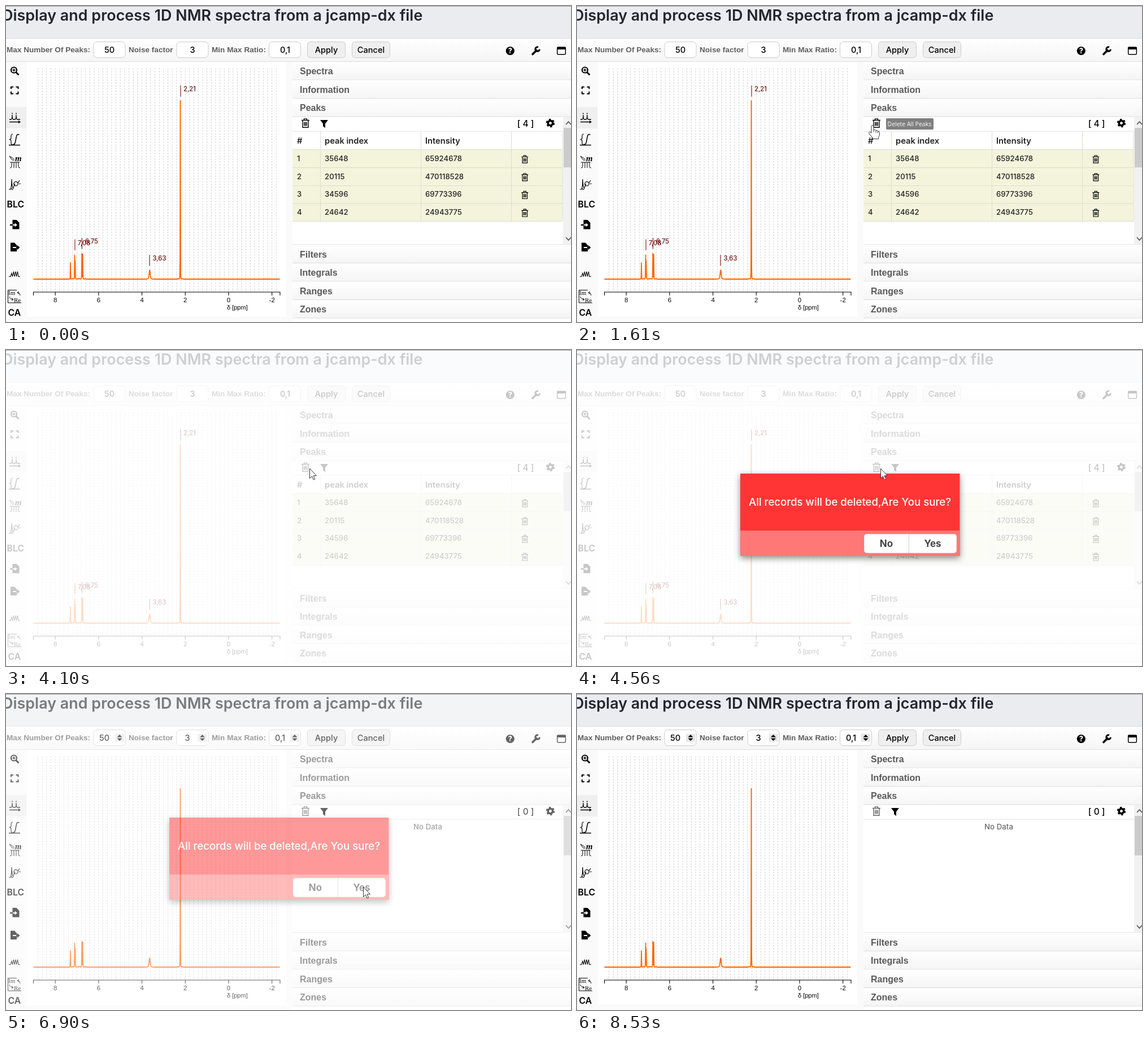
These frames come from a looping animation (1000x560 px, 9480 ms). An HTML page:

```html
<!DOCTYPE html>
<html lang="en">
<head>
<meta charset="utf-8">
<title>NMR peak deletion</title>
<style>
  html, body { margin: 0; height: 100%; overflow: hidden; background: #fafafa; }
  svg { display: block; width: 100vw; height: 100vh; }
  text { font: 500 14.6px Inter, sans-serif; }
  .title { font-size: 26.95px; font-weight: 600; fill: #24252d; }
  .label { font: bold 13.6px "Liberation Sans", Arial, sans-serif; fill: #5f5f5f; }
  .panel { font: bold 16px "Liberation Sans", Arial, sans-serif; fill: #5a5a5a; }
  .axis { font: 11.5px "Liberation Sans", Arial, sans-serif; }
  .head { font-weight: 600; font-size: 14.7px; fill: #222; }
  .cell { font-size: 13.2px; fill: #222; }
  .peak { font-size: 11.2px; fill: #6e1010; }
  .tool { font-size: 15.8px; font-weight: 600; }
  .serif { font: 11px "Liberation Serif", serif; }
  .mid { text-anchor: middle; }
  .line { fill: none; stroke: #000; }
</style>
</head>
<body>
<svg id="stage" viewBox="0 0 1000 560" preserveAspectRatio="none"></svg>
<script>
const LOOP = 9480;
const text = (x, y, s, cls = '', extra = '') => `<text x="${x}" y="${y}" class="${cls}" ${extra}>${s}</text>`;
const rect = (x, y, w, h, fill, extra = '') => `<rect x="${x}" y="${y}" width="${w}" height="${h}" fill="${fill}" ${extra}/>`;
const line = (d, width = 1, stroke = '#000', extra = '') =>
  `<path class="line" d="${d}" style="stroke:${stroke};stroke-width:${width}" ${extra}/>`;
const group = (id, body) => `<g id="${id}">${body}</g>`;
const bin = (x, y, scale = 1) =>
  `<g transform="translate(${x} ${y}) scale(${scale})">` +
  line('M-7-5H7M-2.5-5V-7.6H2.5V-5M-5-5V7.8H5V-5M-2.2-2V5M0-2V5M2.2-2V5', 1.4) + '</g>';

function header() {
  const field = x => rect(x, 63.5, 56, 28, '#fff', 'rx="6" stroke="#ccc"');
  const button = (x, w, s) => rect(x, 63.5, w, 28, '#efefef', 'rx="5" stroke="#ccc"') + text(x + w / 2, 82.5, s, 'mid');
  const values = dx => [[183, '50'], [330, '3'], [494, '0,1']].map(([x, s]) => text(x + dx, 82.5, s, 'mid')).join('');
  const spinners = [201, 347.5, 511].map(x =>
    rect(x - 8, 70.5, 16, 14, '#e6e6e6') +
    `<path d="M${x - 4.5} 76.5l4.5-4.5 4.5 4.5zM${x - 4.5} 78.5l4.5 4.5 4.5-4.5z"/>`).join('');
  return rect(0, 0, 1000, 57.5, '#ebecf0') + rect(0, 0, 1000, 1, '#a0a0a0') +
    text(-7, 25.5, 'Display and process 1D NMR spectra from a jcamp-dx file', 'title') +
    rect(0, 57.5, 1000, 41, 'url(#bar)') + line('M0 57.5H1000M0 98.5H1000', 1, '#dedede') +
    text(1, 81.5, 'Max Number Of Peaks:', 'label') + text(217, 81.5, 'Noise factor', 'label') +
    text(364, 81.5, 'Min Max Ratio:', 'label') +
    field(155) + field(302) + field(465.5) + button(533.5, 67, 'Apply') + button(612.5, 67, 'Cancel') +
    group('plainValues', values(0)) + group('spinValues', values(-9) + spinners) +
    '<circle cx="892.3" cy="79.5" r="7.6"/>' +
    text(892.3, 84, '?', 'mid', 'style="fill:#fff;font-weight:800;font-size:12.5px"') +
    line('M932 85.5L939 78.5', 3.6, '#000', 'stroke-linecap="round"') + line('M942 73a3.8 3.8 0 1 0 2.4 3.6', 3) +
    rect(975.7, 73.2, 14.6, 12.6, '#fff', 'rx="1.5" stroke="#000" stroke-width="1.5"') + rect(975, 72.5, 16, 4.5, '#000', 'rx="1.5"');
}

function toolbar() {
  return rect(0, 179, 36, 38, '#efefef') +
    '<circle class="line" cx="14" cy="113.5" r="5" stroke-width="2.2"/>' +
    line('M17.8 117.5l4.7 4.7', 2.8) + line('M11.2 113.5h5.6M14 110.7v5.6', 1.4) +
    line('M9 147v-3.5h4M17.5 143.5h4v3.5M21.5 151.5v4h-4M13 155.5H9v-4', 2) +
    line('M6 201h3q2 0 2-8 0 8 2 8h3q2 0 2-8 0 8 2 8h5M6 205.5h19m-3-2l3 2-3 2', 1.3) +
    '<circle cx="11" cy="190.5" r="1"/><circle cx="18" cy="190.5" r="1"/>' +
    line('M12 227q-3 0-3 4v3q0 2-3 2.5 3 .5 3 2.5v3q0 4 3 4', 1.2) +
    line('M23.5 228q-4-2-5 3l-2 10q-1 5-4 4M5 246.5h20', 1.5) +
    line('M6 266l8 5M6 266l5 7h4M7 277h17M10 277v7q0 3-3 3M14 277v10M18 277v10M22 277v7q0 3 3 3', 1) +
    text(16, 275, 'm', 'serif', 'style="font-size:15px;font-style:italic;font-weight:bold"') +
    line('M5 325h3q2-4 2-18 1 18 3 15l3-7M24 309l-3 5M23 315h3M9 323q2 5 4 0', 1.2) +
    '<circle class="line" cx="17.5" cy="315" r="3.7" stroke-width="1.2"/>' +
    text(1.5, 357, 'BLC', 'tool') +
    '<path d="M11.5 379h7l5 5v11.5h-12z"/>' + line('M7 388h6', 2.5) +
    line('M12 388h5', 2, '#fff') + '<path d="M15.5 384.5l4.5 3.5-4.5 3.5z" fill="#fff"/>' +
    '<path d="M8 419.5h7l4 4.5v11H8z"/>' + line('M12 428h6', 2, '#fff') + line('M18 428h3', 2.2) +
    '<path d="M19.5 423.5l5 4.5-5 4.5z"/>' +
    line('M5 479.5h3l2-6 1.5 6 2-9 1.5 9 2-9 1.5 9 2-9 1.5 9h3', 1.1) +
    text(4, 512, 'Im', 'serif') + text(14, 525, 'Re', 'serif') +
    line('M3.5 503.5H19M3.5 503.5V526H27M20 508q4-1 5 5M20 508l3-2M20 508l3 2M6 515q1 5 7 5m-3-2l3 2-3 2', 1) +
    text(3.5, 549, 'CA', 'tool');
}

function spectrum() {
  const xOf = ppm => 394 - ppm * 38.35;
  let grid = '', curve = '', ticks = '', labels = '';
  for (let k = -11; k <= 44; k++) grid += `M${xOf(k / 5)} 110V507`;
  // centre, height and width of each resonance
  const lines = [[114, 29, .4], [121.5, 42, .4], [122.5, 32, .4], [134.25, 45, .4], [135.75, 44, .4],
    [254.25, 16, 1.7], [308.5, 316, .35], [118, 1, 1], [128, 1, 1], [130.5, 1, 1], [140, 1, 1], [304.5, 1, .8], [312.5, 1, .8]];
  for (let x = 48.5; x <= 484.5; x += .25) {
    const y = lines.reduce((sum, [c, h, w]) => sum + h / (1 + ((x - c) / w) ** 2) ** 2, 0);
    curve += `${curve ? 'L' : 'M'}${x} ${(484 - y).toFixed(2)}`;
  }
  for (let p = 8; p >= -2; p -= 2) {
    ticks += `M${xOf(p)} 507v6`;
    labels += text(xOf(p), 524.5, p, 'axis mid');
  }
  const peaks = [[309, 141, '2,21', 314], [254, 441, '3,63', 259.5], [122, 413.5, '7,08', 127], [134.5, 411, '6,75', 140]];
  return rect(37, 99, 459, 452, '#fff') + line(grid, 1, '#d2d2d2', 'stroke-dasharray="3 2"') +
    line('M48.5 513v-6H485v6' + ticks, 1.1) + labels + text(391, 537.5, 'δ [ppm]', 'axis', 'style="font-size:11px"') +
    line(curve, 1.8, '#ff6600', 'stroke-linejoin="round"') +
    group('peakLabels', peaks.map(([x, y, s, tx]) =>
      line(`M${x} ${y}v19.5`, 1.1, '#7a1010') + text(tx, y + 10, s, 'peak')).join(''));
}

function panels() {
  const bars = [['Spectra', 99], ['Information', 131.5], ['Peaks', 164], ['Filters', 423.5], ['Integrals', 456], ['Ranges', 488.5], ['Zones', 521]];
  const rows = [[35648, 65924678], [20115, 470118528], [34596, 69773396], [24642, 24943775]];
  const table = rect(507, 254, 478, 127.5, '#f4f4dc') +
    line('M507 254.5H985M507 286.5H985M507 318.5H985M507 350H985M507 381.5H985M556.5 222V381M734.5 222V381M894.5 222V381M985 222V381', 1, '#dcdcd4') +
    text(515, 243.5, '#', 'head') + text(564, 243.5, 'peak index', 'head') + text(742, 243.5, 'Intensity', 'head') +
    rows.map(([index, intensity], i) => {
      const y = 275 + i * 31.7;
      return text(515, y, i + 1, 'cell') + text(564, y, index, 'cell') + text(742, y, intensity, 'cell') + bin(918.3, y - 3.5, .85);
    }).join('');
  const count = n => text(934.5, 214, `[ ${n} ]`, '', 'text-anchor="end" style="font-size:15.5px"');
  return rect(507, 99, 493, 461, '#fff') +
    bars.map(([s, y]) => rect(507, y, 493, 32, 'url(#bar)') + line(`M507 ${y + 32}H1000`, 1, '#dcdcdc') +
      text(520, y + 22, s, 'panel')).join('') +
    line('M507 222H986M507 422.5H1000', 1, '#e2e2e2') +
    group('bigBin', bin(530, 207.5)) +
    '<path d="M556 202h14l-5 6.5v7.5l-4-3v-4.5z"/>' +
    '<g class="line" transform="translate(963.5 207.5)"><circle r="4.2" stroke-width="3.6"/><circle r="6.4" stroke-width="2.6" stroke-dasharray="3.35"/></g>' +
    rect(986, 196.5, 14, 226, '#f1f1f1') + rect(987, 216, 13, 70, '#cbcbcb') +
    line('M991 210l4.5-5 4.5 5M991 410l4.5 5 4.5-5', 1.6, '#505050') +
    group('filled', table + count(4)) +
    group('empty', count(0) + text(746.5, 240.3, 'No Data', 'mid', 'style="font-size:13.3px;fill:#6a6a6a"'));
}

const tooltip = rect(547, 199, 84, 20, '#7f7f7f', 'rx="2"') +
  text(549.5, 213, 'Delete All Peaks', '', 'style="font:10.5px Open Sans,sans-serif;fill:#fff"');

const dialog = rect(289, 219, 388.5, 146, '#ff3636', 'filter="url(#shadow)"') + rect(289, 320, 388.5, 45, '#ff7777') +
  text(483, 276, 'All records will be deleted,Are You sure?', 'mid', 'style="font-size:18.6px;fill:#fff"') +
  rect(508, 326, 164, 34, '#fff', 'rx="5" stroke="#d8a0a0" stroke-width=".6"') +
  group('hover', '<path d="M588 326h79q5 0 5 5v24q0 5-5 5h-79z" fill="url(#press)"/>') +
  line('M587.5 326V360', 1, '#ccc') +
  [[547.5, 'No'], [629.5, 'Yes']].map(([x, s]) => text(x, 349, s, 'mid', 'style="font-size:17px;font-weight:700;fill:#444"')).join('');

const pointer = '<g fill="#fff" stroke="#333" stroke-linejoin="round">' +
  group('arrow', '<path d="M.5 0V17.5L4.5 13.8 7.2 20 9.8 18.8 7.1 12.8H12.5Z"/>') +
  group('hand', '<path d="M-2 2Q-2 0 0 0T2 2V8Q5 6.5 6 9 9 8 9.5 10.5 12.5 10 12.5 13V17L10.5 21V24H0V22L-6 14.5Q-7.5 11.5-4.5 11.5L-2 13.5Z"/>' +
    line('M2 8v4M6 9v4M9.5 10.5v3', 1, '#333')) + '</g>';

const gradient = (id, from, to) =>
  `<linearGradient id="${id}" x2="0" y2="1"><stop stop-color="${from}"/><stop offset="1" stop-color="${to}"/></linearGradient>`;

const $ = id => document.getElementById(id);
$('stage').innerHTML = '<defs>' + gradient('bar', '#fff', '#f5f5f5') + gradient('press', '#fff', '#ededed') +
  '<filter id="shadow" x="-10%" y="-15%" width="120%" height="135%"><feDropShadow dx="0" dy="4" stdDeviation="6" flood-opacity=".45"/></filter></defs>' +
  header() + toolbar() + spectrum() + panels() + group('tooltip', tooltip) +
  group('veil', rect(0, 1, 1000, 559, '#fff', 'opacity=".78"')) + group('dialog', dialog) +
  '<circle id="click" r="13.5" fill="#fff01e" style="mix-blend-mode:multiply"/>' + group('pointer', pointer);

const moves = [
  { start: 610, end: 1530, steps: 13, points: [[812, 548], [700, 455], [520, 400], [416, 310], [490, 216]] },
  { start: 1610, end: 2220, steps: 9, points: [[523, 211.5], [531, 212], [537, 210]] },
  { start: 5110, end: 5740, steps: 9, points: [[543, 222], [585, 310], [622, 380], [632, 342]] },
  { start: 8060, end: 8530, steps: 7, points: [[645, 355], [710, 410], [790, 480], [853, 552]] },
];

// Catmull-Rom curve through the points, u from 0 to 1
function along(points, u) {
  const n = points.length - 1, i = Math.min(n - 1, Math.floor(u * n)), f = u * n - i;
  const [a, b, c, d] = [-1, 0, 1, 2].map(k => points[Math.max(0, Math.min(n, i + k))]);
  return [0, 1].map(j => b[j] + f / 2 * (c[j] - a[j] +
    f * (2 * a[j] - 5 * b[j] + 4 * c[j] - d[j] + f * (3 * (b[j] - c[j]) + d[j] - a[j]))));
}

function pointerAt(t) {
  const move = moves.filter(m => t >= m.start).pop() || moves[0];
  const last = move.steps - 1;
  const k = Math.min(last, Math.floor((t - move.start) / (move.end - move.start) * last + .05));
  return along(move.points, Math.max(0, k) / last);
}

const show = (id, opacity) => {
  $(id).style.display = opacity > 0 ? '' : 'none';
  $(id).style.opacity = Number(opacity);
};

function draw(t) {
  const within = (a, b) => t >= a && t < b;
  const deleted = t >= 6900;
  const closing = deleted ? .5 : 1;
  const hand = within(1610, 4100) || within(5655, 6900);
  const [x, y] = pointerAt(t);

  for (const id of ['filled', 'peakLabels', 'plainValues']) show(id, !deleted);
  for (const id of ['empty', 'spinValues']) show(id, deleted);
  show('bigBin', deleted ? .6 : 1);
  show('tooltip', within(1610, 4100));
  show('veil', within(4100, 6980) && closing);
  show('dialog', within(4330, 6980) && closing * Math.min(1, (t - 4250) / 310));
  show('hover', within(5655, 6900));
  show('click', within(3480, 3550) ? .45 : within(3550, 4100) || within(6670, 6900) ? .8 : 0);
  show('pointer', within(610, 8530));
  show('arrow', !hand);
  show('hand', hand);
  $('pointer').setAttribute('transform', `translate(${x} ${y})`);
  $('click').setAttribute('transform', `translate(${x} ${y})`);
}

const origin = performance.now();
function frame() {
  draw((performance.now() - origin) % LOOP);
  requestAnimationFrame(frame);
}
frame();
</script>
</body>
</html>
```
